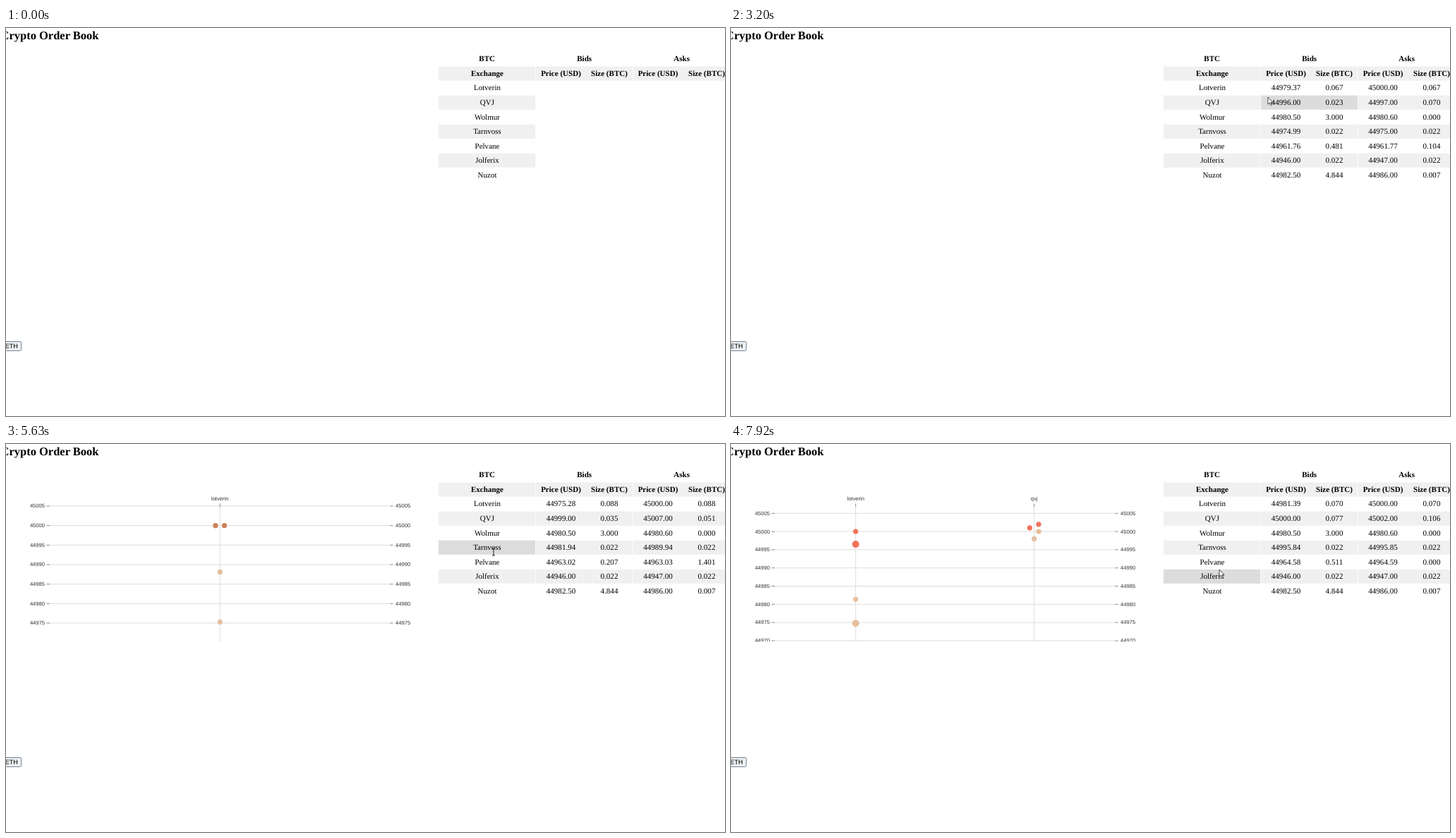
Animation of 1019 by 550 pixels, one loop 7.99 s. Source, as an HTML page:

```html
<!DOCTYPE html>
<html lang="en">
<head>
<meta charset="utf-8">
<title>Crypto Order Book</title>
<style>
html, body { margin: 0; width: 100%; height: 100%; overflow: hidden; background: #fff; }
svg { display: block; width: 1019px; height: 550px; }
text { text-rendering: geometricPrecision; }
.serif { font-family: "Liberation Serif", "Times New Roman", serif; font-size: 11.05px; }
.sans { font-family: "Liberation Sans", Arial, sans-serif; font-size: 7.6px; fill: #333; }
.mid { text-anchor: middle; }
.end { text-anchor: end; }
.bold { font-weight: bold; }
</style>
</head>
<body>
<svg id="stage" viewBox="0 0 1019 550">
  <defs><clipPath id="plotClip"><rect width="600" height="280"/></clipPath></defs>
  <text class="serif bold end" x="131.5" y="15.6" style="font-size:16.5px">Crypto Order Book</text>
  <rect x="-20" y="444.5" width="41.8" height="13" rx="2" fill="#eef1f4" stroke="#71808f"/>
  <text class="sans end" x="17" y="454.3" style="font-size:9.2px;fill:#000">ETH</text>
  <g id="chart" clip-path="url(#plotClip)"></g>
  <g id="table"></g>
  <g id="cursor">
    <path id="arrow" d="M0 0V10.2L2.4 8L4 11.6L5.6 10.9L4 7.4H7.2Z" fill="#fff" stroke="#222" stroke-width=".8"/>
    <path id="beam" d="M-2 0H2M0 0V10M-2 10H2" fill="none" stroke="#222" stroke-width="1"/>
  </g>
</svg>
<script>
const LOOP = 7990, TICK = 70;
const BURSTS = [0, 330, 730, 1000, 1810, 2080, 2920, 3760, 4580, 5420, 6250, 7150];
const $ = id => document.getElementById(id);

function add(parent, tag, attrs, text) {
  const node = document.createElementNS("http://www.w3.org/2000/svg", tag);
  for (const key in attrs) node.setAttribute(key, attrs[key]);
  if (text !== undefined) node.textContent = text;
  parent.appendChild(node);
  return node;
}
const clamp = (v, low, high) => Math.min(high, Math.max(low, v));
const lerp = (a, b, u) => a + (b - a) * u;
const random = seed => { const v = Math.sin(seed * 12.9898) * 43758.5453; return v - Math.floor(v); };

// Market data
const quote = (bid, ask, bidSize, askSize = bidSize) => ({ bid, ask, bidSize, askSize });
const fixed = value => () => value;
const latest = (trades, t) => trades.filter(trade => trade.time <= t).pop();

const lotverin = [
  [330, 44979.37, 44999.99, .067], [2640, 44979.37, 45000, .067],
  [3690, 44974.77, 44998.51, .167], [4650, 44988.1, 44999.99, .088],
  [5490, 44975.28, 45000, .088], [6050, 44985.6, 45000, .1],
  [6460, 44974.78, 44996.51, 1.3], [6950, 44981.39, 45000, .07]
].map(([time, ...values]) => ({ time, ...quote(...values) }));

const qvj = [
  [730, 44994, 44995], [2990, 44996, 44997], [4860, 44998, 45003], [5420, 44999, 45007],
  [6320, 44998, 45002], [6600, 44994, 45002], [7290, 44998, 45001], [7430, 45000, 45002]
].map(([time, bid, ask]) =>
  ({ time, ...quote(bid, ask, .02 + .1 * random(time), .05 + .1 * random(ask)) }));

function climbing(t) {
  const step = clamp(Math.floor((t - 4000) / 1050), 0, 3), bid = 44974.99 + 6.95 * step;
  return quote(bid, bid + (step % 3 ? 8 : .01), .022);
}
function jittery(t) {
  const now = Math.max(t, 2080);
  const bid = 44960.6 + (now - 2080) * .0006 + random(now) * 1.6;
  return quote(bid, bid + .01, 1.5 * random(now + 1) ** 3, 1.5 * random(now + 2) ** 3);
}

const exchanges = [
  { name: "Lotverin", opens: 330, trades: lotverin, charted: 3830, at: t => latest(lotverin, t) },
  { name: "QVJ", opens: 730, trades: qvj, charted: 6460, at: t => latest(qvj, t) },
  { name: "Wolmur", opens: 800, at: fixed(quote(44980.5, 44980.6, 3, 0)) },
  { name: "Tarnvoss", opens: 1070, at: climbing },
  { name: "Pelvane", opens: 1210, at: jittery },
  { name: "Jolferix", opens: 1560, at: fixed(quote(44946, 44947, .022)) },
  { name: "Nuzot", opens: 1810, at: fixed(quote(44982.5, 44986, 4.844, .007)) }
];

// Table
const ROW_H = 20.53, CELL_W = 137.2;
const cellX = col => 613 + 138 * col;
const rowTop = row => 33.6 + ROW_H * row;
const cellRect = (col, row, fill) =>
  add($("table"), "rect", { x: cellX(col), y: rowTop(row) + .4, width: CELL_W, height: 20.1, fill });
const cellText = (x, row, text, bold) =>
  add($("table"), "text", { x, y: rowTop(row) + 13.8, class: "serif mid" + (bold ? " bold" : "") }, text);

const PAIR_X = [786.5, 855, 924, 993];
["BTC", "Bids", "Asks"].forEach((label, col) => {
  cellText(cellX(col) + 68.7, 0, label, true);
  cellRect(col, 1, "#f0f0f0");
});
cellText(682, 1, "Exchange", true);
PAIR_X.forEach((x, i) => cellText(x, 1, i % 2 ? "Size (BTC)" : "Price (USD)", true));
exchanges.forEach((ex, i) => {
  ex.rects = [0, 1, 2].map(col => cellRect(col, i + 2));
  cellText(682, i + 2, ex.name);
  ex.texts = PAIR_X.map(x => cellText(x, i + 2, ""));
});

const inside = (v, start, size) => v >= start && v < start + size;

function drawTable(t, pointer) {
  exchanges.forEach((ex, i) => {
    const open = t >= ex.opens;
    if (open) {
      const { bid, bidSize, ask, askSize } = ex.at(t);
      [bid, bidSize, ask, askSize].forEach((v, j) => { ex.texts[j].textContent = v.toFixed(2 + j % 2); });
    } else {
      ex.texts.forEach(node => { node.textContent = ""; });
    }
    ex.rects.forEach((rect, col) => {
      const hover = pointer && inside(pointer.y, rowTop(i + 2), ROW_H) && inside(pointer.x, cellX(col), CELL_W);
      const shown = col === 0 || open;
      rect.setAttribute("fill", !shown ? "none" : hover ? "#dcdcdc" : i % 2 ? "#f0f0f0" : "none");
    });
  });
}

// Chart: the two latest distinct bids and asks of every charted exchange
function recentDots({ trades, charted }, col, t) {
  const seen = trades.filter((trade, i) =>
    trade.time <= t && (i + 1 === trades.length || trades[i + 1].time > charted)).reverse();
  return ["bid", "ask"].flatMap(side =>
    [...new Set(seen.map(trade => trade[side]))].slice(0, 2).map(price => {
      const size = seen.find(trade => trade[side] === price)[side + "Size"];
      return { col, side, price, r: size > 1 ? 5 : 3.6 };
    })).sort((a, b) => b.price - a.price);
}

function drawChart(t) {
  const chart = $("chart");
  chart.replaceChildren();
  const picked = exchanges.filter(ex => ex.charted <= t);
  if (!picked.length) return;

  const groups = picked.map((ex, col) => recentDots(ex, col, t));
  const prices = groups.flat().map(d => d.price);
  const low = Math.min(...prices) - 5, high = Math.max(...prices) + 5;
  const yOf = price => 280 - 192 * (price - low) / (high - low);
  const xOf = col => 50.2 + 506 * (col + .5) / picked.length;
  const line = (d, stroke) => add(chart, "path", { d, stroke, fill: "none" });

  for (let price = Math.ceil(low / 5) * 5; price <= high; price += 5) {
    const y = yOf(price);
    line(`M62 ${y}H545`, "#ddd");
    line(`M57.5 ${y}H62M544.5 ${y}H548.5`, "#888");
    add(chart, "text", { x: 55, y: y + 2.4, class: "sans end" }, price);
    add(chart, "text", { x: 552, y: y + 2.4, class: "sans" }, price);
  }
  picked.forEach((ex, col) => {
    const x = xOf(col);
    line(`M${x} 89V280`, "#ddd");
    line(`M${x} 84.5V89`, "#888");
    add(chart, "text", { x, y: 79.5, class: "sans mid" }, ex.name.toLowerCase());
  });

  const fills = { ask: picked.length === 1 ? "#cd8159" : "#f3725b", bid: "#e6bf9e" };
  groups.forEach(dots => dots.forEach((d, i) => {
    const crowded = dots.some(o => o !== d && Math.abs(yOf(o.price) - yOf(d.price)) < 7);
    const shift = crowded ? (i % 2 ? -6.3 : 6.3) : 0;
    add(chart, "circle", { cx: xOf(d.col) + shift, cy: yOf(d.price), r: d.r, fill: fills[d.side] });
  }));
}

// Pointer moves: start, duration, destination
const moves = [
  [1000, 610, 656, 336], [2430, 420, 672, 162], [2850, 210, 761, 98],
  [3220, 330, 703, 84], [4720, 490, 691, 148], [6100, 220, 690, 105],
  [6740, 140, 685, 139], [6880, 420, 690, 253], [7460, 460, 692, 178]
];

function pointerAt(t) {
  if (t < moves[0][0]) return null;
  const p = { x: 136, y: 488 };
  for (const [start, duration, x, y] of moves) {
    if (t < start) break;
    const u = clamp((t - start) / duration, 0, 1), eased = u * u * (3 - 2 * u);
    p.x = lerp(p.x, x, eased);
    p.y = lerp(p.y, y, eased);
    p.resting = t > start + duration;
  }
  return p;
}

function drawCursor(p) {
  $("cursor").style.display = p ? "" : "none";
  if (!p) return;
  const overName = p.resting && Math.abs(p.x - 682) < 16 && p.y < rowTop(9);
  $("arrow").style.display = overName ? "none" : "";
  $("beam").style.display = overName ? "" : "none";
  $("cursor").setAttribute("transform", `translate(${p.x} ${p.y})`);
}

let drawnTime;
function render(time) {
  const start = BURSTS.filter(b => b <= time).pop();
  const t = start + TICK * Math.min(11, Math.floor((time - start) / TICK));
  if (t === drawnTime) return;
  drawnTime = t;
  drawTable(t, pointerAt(t - 2 * TICK)); // hover trails the pointer
  drawChart(t);
  drawCursor(pointerAt(t));
}

const begin = performance.now();
function frame() {
  render((performance.now() - begin) % LOOP);
  requestAnimationFrame(frame);
}
frame();
</script>
</body>
</html>
```
